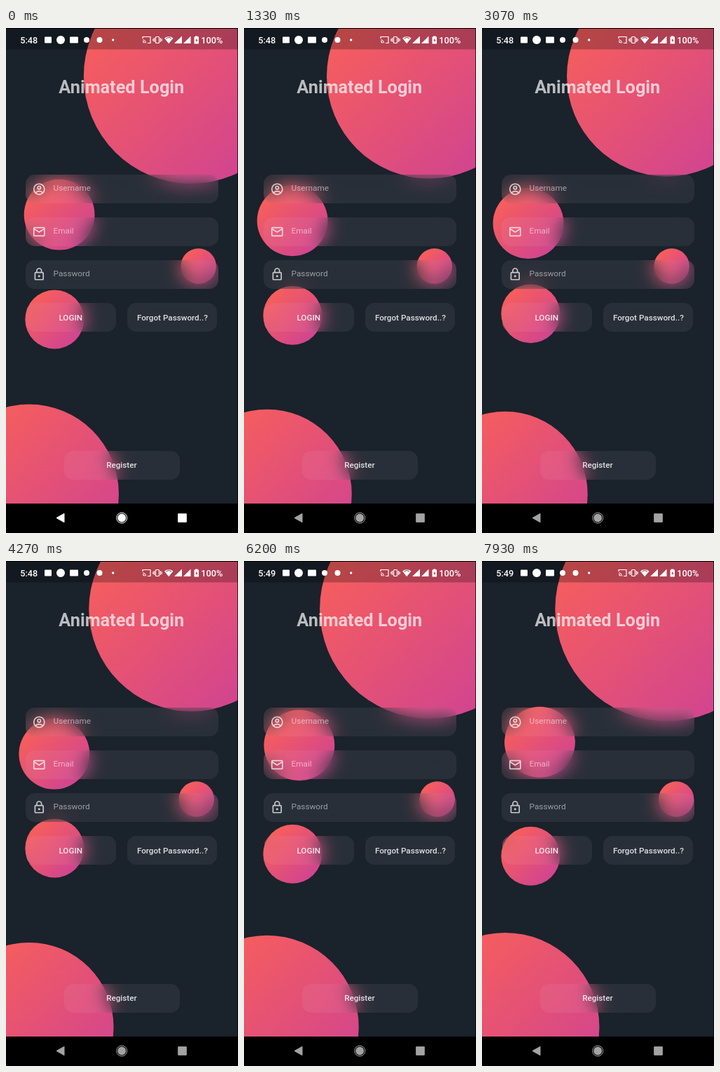
An HTML page for the animation above (8000 ms loop, 331 by 720 pixels).

```html
<!DOCTYPE html>
<html lang="en">
<head>
<meta charset="utf-8">
<title>Animated Login</title>
<style>
  html, body { margin: 0; width: 100%; height: 100%; overflow: hidden; background: #1a222b; }
  svg { position: absolute; left: 0; top: 0; font: 11.8px Roboto, sans-serif; }
  .glass {
    position: absolute; height: 41.3px; border-radius: 12.6px;
    background: rgba(255, 238, 250, .065);
    backdrop-filter: blur(12.6px);
  }
  .mid { text-anchor: middle; fill: #fff; fill-opacity: .85; }
  .button { font-weight: 500; font-size: 11.7px; }
  .hint { fill: #fff; fill-opacity: .54; }
  .line { fill: none; stroke: #fff; stroke-width: 2; }
  .status { font-weight: 500; font-size: 12.7px; }
</style>
</head>
<body>
<svg id="back" width="331" height="720">
  <defs>
    <linearGradient id="glow" x1="0" y1="0" x2="1" y2="1">
      <stop offset="0" stop-color="#ff6450"/>
      <stop offset="1" stop-color="#c93f9b"/>
    </linearGradient>
  </defs>
  <!-- Opaque ground, so the glass panels blur a filled backdrop -->
  <rect width="331" height="720" fill="#1a222b"/>
</svg>
<div id="panels"></div>
<svg width="331" height="720">
  <rect width="331" height="30.5" fill="#000" fill-opacity=".25"/>
  <path d="M0 678H331V720H0zM0 0H331V678H330.300V1H0z"/>

  <g fill="#fff" class="status">
    <text id="clock" x="20.3" y="21.6">5:48</text>
    <rect x="55" y="12.5" width="10" height="9" rx="1"/>
    <circle cx="78" cy="17" r="6"/>
    <rect x="91" y="12.5" width="12" height="9" rx="1"/>
    <circle cx="115" cy="17" r="4"/>
    <circle cx="133.5" cy="17" r="4"/>
    <circle cx="152.7" cy="17" r="1.7"/>
    <g fill="none" stroke="#fff" stroke-width="1.2">
      <path d="M195 15V12.5h11v9h-4M195 17a4.5 4.5 0 0 1 4.5 4.5M195 19.3a2.2 2.2 0 0 1 2.2 2.2"/>
      <rect x="213.5" y="12.5" width="5" height="9" rx="1"/>
      <path d="M211.5 14v6M220.5 14v6M209.8 15.5v3M222.2 15.5v3"/>
    </g>
    <path d="M226 14.5a9.5 9.5 0 0 1 12.5 0L232.2 22.3z"/>
    <path d="M228.5 15.2a6 6 0 0 1 7.5 0" fill="none" stroke="#473139" stroke-width=".9"/>
    <path d="M240.5 22V21.5L251 11.5V22zM253 22L263.5 11.5V22z"/>
    <path d="M270 12.5V11.5h3.5v1h1.5v10h-6.5v-10z"/>
    <path d="M272.3 14.5l-2 3.4h1.3v2.6l2-3.5h-1.3z" fill="#a74650"/>
    <text x="278.3" y="21.6">100%</text>
  </g>

  <text x="164.8" y="92.9" class="mid" style="font-size:25.3px;font-weight:700;fill-opacity:.7">Animated Login</text>

  <g opacity=".74">
    <g class="line" transform="translate(37.2 219.7) scale(.84)">
      <circle cx="12" cy="12" r="9"/>
      <circle cx="12" cy="9.5" r="2.6"/>
      <path d="M5.800 18.200c1.600-1.900 3.800-2.800 6.200-2.800s4.600.9 6.200 2.800"/>
    </g>
    <g class="line" transform="translate(37.2 280.4) scale(.84)">
      <rect x="3" y="5" width="18" height="14" rx="1"/>
      <path d="M3 7l9 5.600L21 7"/>
    </g>
    <g class="line" transform="translate(37.2 341.1) scale(.84)">
      <rect x="5" y="9" width="14" height="12" rx="1"/>
      <path d="M8 9V6a4 4 0 0 1 8 0v3"/>
      <circle cx="12" cy="15" r="1.8" fill="#fff" stroke="none"/>
    </g>
  </g>
  <text class="hint" x="67.5" y="232.3">Username</text>
  <text class="hint" x="67.5" y="293">Email</text>
  <text class="hint" x="67.5" y="353.9">Password</text>
  <text class="mid button" x="92.2" y="416.5">LOGIN</text>
  <text class="mid button" x="237.4" y="416.5">Forgot Password..?</text>
  <text class="mid button" x="164.9" y="627.4">Register</text>

  <g id="nav" fill="#fff" stroke="#fff" stroke-linejoin="round">
    <path d="M72 698.5L83 692.3V704.7z"/>
    <circle cx="165.2" cy="698.5" r="5.9" stroke="none"/>
    <circle cx="165.2" cy="698.5" r="7.5" fill="none"/>
    <rect x="245.7" y="692.7" width="11.6" height="11.6"/>
  </g>
</svg>
<script>
const W = 330, H = 677, TOP = 1, DP = W / 392.7;
const LOOP = 8000, SWING = 5000, TURN = 2830, FRAME = 200 / 3;

// Each pair holds a value at both ends of the swing: x and y relative to the screen, radius in dp.
const balls = [
  { x: [.21, .21], y: [.6, .62], r: [50, 50] },
  { x: [.1, .1], y: [.98, .98], r: [140, 160] },
  { x: [.82, .84], y: [.5, .5], r: [30, 30] },
  { x: [.2, .25], y: [.41, .38], r: [60, 60] },
  { x: [.8, .8], y: [.1, .1], r: [170, 190] }
];

// Left, top and width of each glass panel.
const panels = [
  [27.5, 209, 275.3], [27.5, 269.8, 275.3], [27.5, 330.7, 275.3],
  [28.6, 391.7, 128.3], [173.2, 391.7, 128.3], [82.5, 602.7, 165.3]
];

const byId = id => document.getElementById(id);

const swings = balls.map(({ x, y, r }) => {
  const ball = document.createElementNS('http://www.w3.org/2000/svg', 'circle');
  ball.setAttribute('fill', 'url(#glow)');
  byId('back').append(ball);
  const pose = i => ({ cx: x[i] * W + 'px', cy: TOP + y[i] * H + 'px', r: r[i] * DP + 'px' });
  const swing = ball.animate([pose(0), pose(1)], {
    duration: SWING, direction: 'alternate', iterations: Infinity, easing: 'ease-in-out'
  });
  swing.pause();
  return swing;
});

for (const [left, top, width] of panels) {
  const panel = document.createElement('div');
  panel.className = 'glass';
  panel.style.cssText = `left:${left}px;top:${top}px;width:${width}px`;
  byId('panels').append(panel);
}

function draw(time) {
  const t = Math.floor((time % LOOP + 4) / FRAME) * FRAME;
  for (const swing of swings) swing.currentTime = t - TURN + 2 * SWING;
  byId('clock').textContent = t < 4800 ? '5:48' : '5:49';
  const dim = Math.min(1, Math.max(0, (t - 200) / 700));
  byId('nav').style.opacity = 1 - .36 * dim;
}

const start = performance.now();
function tick() {
  draw(performance.now() - start);
  requestAnimationFrame(tick);
}
tick();
</script>
</body>
</html>
```
